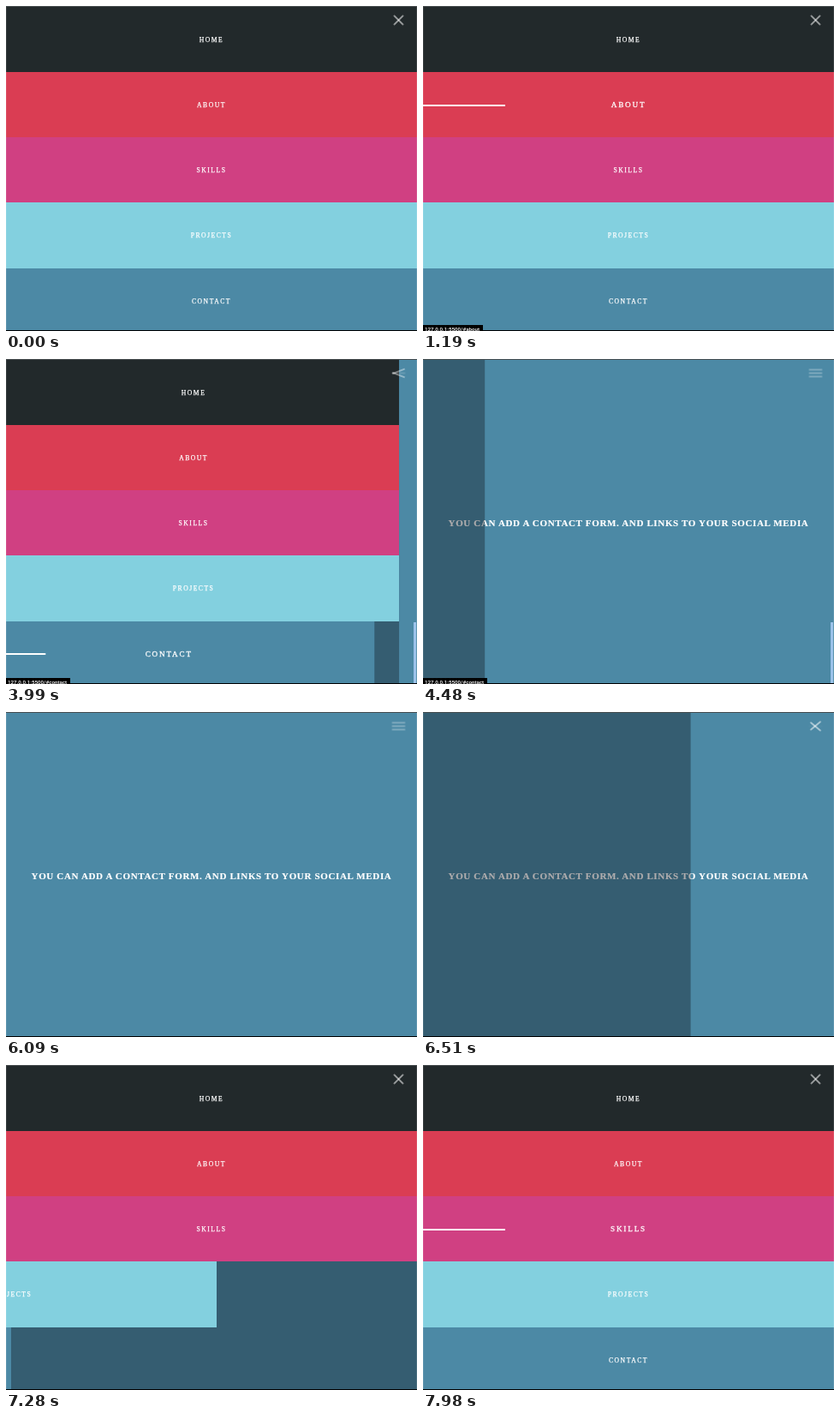
An HTML page for the animation above (8000 ms loop, 480x379 px).

```html
<!DOCTYPE html>
<html lang="en">
<head>
<meta charset="utf-8">
<title>Sliding menu</title>
<style>
@property --on { syntax: "<number>"; inherits: true; initial-value: 0; }

html, body { margin: 0; width: 100%; height: 100%; overflow: hidden; }
body {
  position: relative;
  background: #4c89a5;
  color: #fff;
  font-family: "Liberation Serif", "Times New Roman", serif;
}
body > *, li, li::before { position: absolute; }

h1 {
  top: 181px; width: 480px; margin: 0;
  font-size: 11px; line-height: 20px; letter-spacing: .65px;
  text-align: center; white-space: nowrap;
  -webkit-text-stroke: .2px;
}
.scroll {
  left: 476px; top: 307px; width: 3px; height: 71px;
  background: #9cc3ea; opacity: 0;
  animation: scroll 8s linear infinite;
}

/* menu */
nav {
  left: 0; top: 0; width: 480px; height: 379px;
  background: rgba(8, 2, 6, .325);
  animation: nav 8s ease-in-out infinite;
}
ul { margin: 0; padding: 0; list-style: none; }
li {
  left: 0; top: calc(1px + 76.15px * var(--i));
  width: 480px; height: 76.2px;
  background: var(--c);
  font-size: 7.6px; line-height: 78px; letter-spacing: 1.53px;
  text-align: center;
  -webkit-text-stroke: .25px;
  animation: out 8s linear calc(4367ms - 100ms * var(--i)) infinite,
             in 8s linear calc(4876ms + 200ms * var(--i)) infinite,
             var(--hover, none) 8s step-end infinite;
}
li::before {
  content: ""; left: 0; top: calc(50% - .5px);
  width: 96px; height: 2px;
  background: #fff; opacity: var(--on);
}
li span { display: block; scale: calc(1 + .2 * var(--on)); }

/* icon */
svg { left: 0; top: 0; }
line { stroke: #fff; stroke-width: 1.1; animation: 8s ease infinite; }
.top { animation-name: top; }
.mid { animation-name: mid; }
.low { animation-name: low; }

/* window edges and link address */
.frame {
  inset: 0; box-sizing: border-box;
  border: solid rgba(255, 255, 255, .1); border-width: 0 1px;
}
.edge { left: 0; width: 480px; height: 1px; }
.status {
  left: 0; top: 372px; height: 7px; padding: 0 4px 0 2px;
  overflow: hidden; background: #000; opacity: var(--on);
  font: 500 6.2px/10px Roboto, sans-serif; white-space: nowrap;
  animation: var(--show) 8s step-end infinite;
}

@keyframes nav {
  0%, 48.34% { transform: none; }
  58.84%, 78.44% { transform: translateX(-100%); }
  83.44%, 100% { transform: none; }
}
@keyframes out {
  0% { transform: none; }
  5%, 25% { transform: translateX(-100%); }
  25.01%, 100% { transform: none; }
}
@keyframes in {
  0%, 20% { translate: -100% 0; }
  25%, 100% { translate: 0 0; }
}
@keyframes top {
  0%, 48.34% { transform: rotate(-45deg); stroke-opacity: 1; }
  53.34%, 78.44% { transform: translateY(-4px) rotate(0deg); stroke-opacity: .5; }
  83.44%, 100% { transform: rotate(-45deg); stroke-opacity: 1; }
}
@keyframes low {
  0%, 48.34% { transform: rotate(45deg); stroke-opacity: 1; }
  53.34%, 78.44% { transform: translateY(4px) rotate(0deg); stroke-opacity: .5; }
  83.44%, 100% { transform: rotate(45deg); stroke-opacity: 1; }
}
@keyframes mid {
  0%, 48.34% { stroke-opacity: 0; }
  53.34%, 78.44% { stroke-opacity: .5; }
  83.44%, 100% { stroke-opacity: 0; }
}
@keyframes scroll {
  0%, 48.4% { opacity: 0; }
  48.5%, 56.5% { opacity: 1; }
  58.5%, 100% { opacity: 0; }
}

@keyframes about { 0% { --on: 0; } 11.37% { --on: 1; } 18.37%, 100% { --on: 0; } }
@keyframes skills {
  0% { --on: 0; } 18.37% { --on: 1; } 23.62% { --on: 0; } 99.7%, 100% { --on: 1; }
}
@keyframes projects { 0% { --on: 0; } 27.12% { --on: 1; } 35%, 100% { --on: 0; } }
@keyframes contact { 0% { --on: 0; } 35% { --on: 1; } 62.5%, 100% { --on: 0; } }

@keyframes show-about { 0% { --on: 0; } 14.87% { --on: 1; } 22.75%, 100% { --on: 0; } }
@keyframes show-skills { 0% { --on: 0; } 22.75% { --on: 1; } 26.25%, 100% { --on: 0; } }
@keyframes show-projects { 0% { --on: 0; } 32.37% { --on: 1; } 40.25%, 100% { --on: 0; } }
@keyframes show-contact { 0% { --on: 0; } 40.25% { --on: 1; } 59.3%, 100% { --on: 0; } }
</style>
</head>
<body>
<h1>YOU CAN ADD A CONTACT FORM. AND LINKS TO YOUR SOCIAL MEDIA</h1>
<div class="scroll"></div>

<nav>
  <ul>
    <li style="--i:0; --c:#22292b"><span>HOME</span></li>
    <li style="--i:1; --c:#da3d53; --hover:about"><span>ABOUT</span></li>
    <li style="--i:2; --c:#d04082; --hover:skills"><span>SKILLS</span></li>
    <li style="--i:3; --c:#83d0df; --hover:projects"><span>PROJECTS</span></li>
    <li style="--i:4; --c:#4c89a5; --hover:contact"><span>CONTACT</span></li>
  </ul>
</nav>

<svg width="480" height="40">
  <g transform="translate(458.5 16.5)">
    <line class="top" x1="-7.7" x2="7.7"/>
    <line class="mid" x1="-7.7" x2="7.7"/>
    <line class="low" x1="-7.7" x2="7.7"/>
  </g>
</svg>

<div class="frame"></div>
<div class="edge" style="top:0; background:#4a5052"></div>
<div class="edge" style="top:378px; background:#000"></div>

<div class="status" style="--show:show-about">127.0.0.1:5500/#about</div>
<div class="status" style="--show:show-skills">127.0.0.1:5500/#skills</div>
<div class="status" style="--show:show-projects">127.0.0.1:5500/#projects</div>
<div class="status" style="--show:show-contact">127.0.0.1:5500/#contact</div>
</body>
</html>
```
